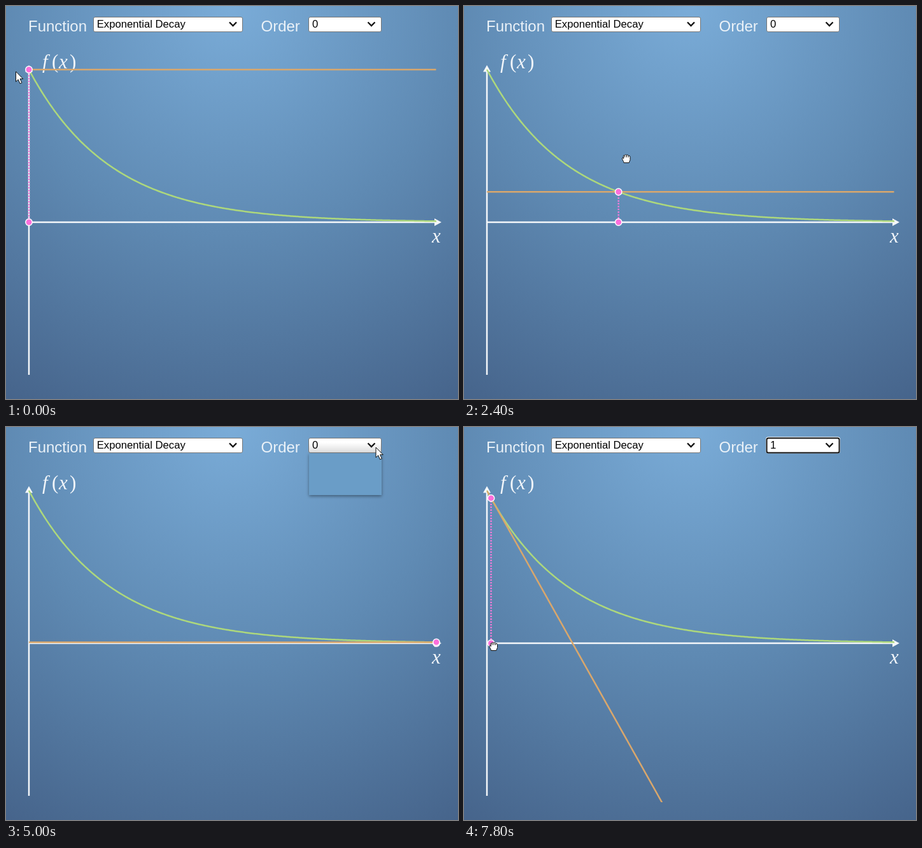
An HTML page that plays this animation: 710x618 px, repeating every 8 s.

```html
<!DOCTYPE html>
<html lang="en">
<head>
<meta charset="utf-8">
<title>Tangent approximation</title>
<style>
  html, body { margin: 0; width: 100%; height: 100%; overflow: hidden; }
  svg { display: block; width: 100%; height: 100%; }
  text { font: 16.7px "Liberation Sans", Arial, sans-serif; }
  .label { font-size: 24px; fill: #ebf2f8; }
  .math { font: 31px "Liberation Serif", "Times New Roman", serif; fill: #f2f6fa; }
  .math .var { font-style: italic; }
  .line { fill: none; stroke-width: 2.5; }
  .box { stroke: #767676; }
  .arrow { fill: none; stroke: #111; stroke-width: 2.3; }
  .cursor { fill: #fff; stroke: #111; stroke-linejoin: round; }
  .dot { fill: #fc6edb; stroke: #fff; stroke-width: 1.5; }
</style>
</head>
<body>
<svg viewBox="0 0 710 618">
  <defs>
    <radialGradient id="sky" gradientUnits="userSpaceOnUse" cx="355" cy="0" r="713">
      <stop offset="0" stop-color="#7aacd8"/>
      <stop offset=".5" stop-color="#5f8ab3"/>
      <stop offset="1" stop-color="#46648b"/>
    </radialGradient>
    <linearGradient id="pressed" x2="0" y2="1">
      <stop offset=".3" stop-color="#fff"/>
      <stop offset="1" stop-color="#dcdcdc"/>
    </linearGradient>
    <clipPath id="plot"><path d="M36 90H676V590H36Z"/></clipPath>
    <filter id="shadow" x="-20%" y="-20%" width="140%" height="150%">
      <feDropShadow dx="0" dy="2" stdDeviation="2.5" flood-opacity=".4"/>
    </filter>
  </defs>
  <rect width="710" height="618" fill="url(#sky)"/>

  <text class="label" x="35" y="40">Function</text>
  <text class="label" x="400.5" y="40">Order</text>
  <rect class="box" x="137.5" y="17.5" width="234" height="23" rx="2.5" fill="#fff"/>
  <text x="142.7" y="34">Exponential Decay</text>
  <path class="arrow" d="M351 25.5l5.5 5.5 5.5-5.5"/>
  <rect id="ring" x="474" y="15.5" width="117" height="26" rx="4" fill="#fff"/>
  <rect id="order" class="box" x="475.5" y="17.5" width="114" height="23" rx="2.5"/>
  <text id="value" x="481" y="34"></text>
  <path class="arrow" d="M568.5 25.5l5.5 5.5 5.5-5.5"/>

  <path class="line" stroke="#f4f7fa" d="M36 580V101M35 340H675"/>
  <path fill="#f4f7fa" d="M36 93l6 10.500h-12zM684 340l-11 -6v12z"/>
  <text class="math" y="98"><tspan class="var" x="57">f</tspan><tspan x="72">(</tspan><tspan class="var" x="83">x</tspan><tspan x="100">)</tspan></text>
  <text class="math var" style="font-style:italic" x="669" y="372">x</text>

  <path id="curve" class="line" stroke="#add87c"/>
  <path id="tangent" class="line" stroke="#d9a76c" clip-path="url(#plot)"/>
  <path id="drop" class="line" stroke="#fa7bdc" stroke-dasharray="2.2 2.2"/>
  <circle id="foot" class="dot" cy="340" r="5.2"/>
  <circle id="point" class="dot" r="5.2"/>

  <g id="panel">
    <rect x="476" y="41" width="114" height="66" fill="#6b9dc7" filter="url(#shadow)"/>
    <g id="options">
      <path fill="#fff" d="M476 41h114v66h-114z"/>
      <rect id="mark" x="476" width="114" height="22" fill="#1967d2"/>
      <text x="481" y="58">0</text>
      <text x="481" y="80">1</text>
      <text x="481" y="102">2</text>
    </g>
  </g>

  <path id="pointer" class="cursor" d="M0 0V16L3.700 12.600 6.500 19 9.300 17.800 6.600 11.600H11.300Z"/>
  <path id="hand" class="cursor" d="M-4 6.500C-4 4-6.500 2-6.500 0Q-6.500-2-4.300-1.500L-4.700-4Q-4.300-6-2.500-5 -1.500-7 .3-5.600 2-6.800 3.300-4.700 6-5 6-2.500V1.500C6 3.500 4.300 4.500 4.300 6.500ZM-4.300-1.500V.5M-2.300-4.800V-2M.5-5.300V-2M3.200-4.500V-2"/>
</svg>
<script>
const STEP = 200, LOOP = 8000;
const el = id => document.getElementById(id);
const set = (id, attrs) => {
  for (const key in attrs) el(id).setAttribute(key, attrs[key]);
};
const show = (id, on) => set(id, { display: on ? "inline" : "none" });

const decay = x => 240 * Math.exp((36 - x) / 128);
const yAt = x => 340 - decay(x);

// [start ms, point x, cursor kind, cursor x, cursor y]
const poses = [
  [0, 36, "pointer", 15.5, 103],
  [1000, 36, "pointer", 27, 101],
  [1200, 36, "hand", 37, 101],
  [1400, 52, "hand", 53, 128],
  [1600, 71.2, "hand", 72.5, 157],
  [1800, 86, "hand", 87, 177],
  [2000, 98, "hand", 101, 193],
  [2200, 162, "hand", 170, 219],
  [2400, 242.7, "hand", 255, 240],
  [2600, 340, "hand", 351, 258],
  [2800, 440, "hand", 451, 270],
  [3000, 530, "hand", 541, 279],
  [3200, 606.5, "hand", 617, 283],
  [3400, 676, "hand", 686, 274],
  [3600, 676],
  [4400, 676, "pointer", 644, 3],
  [4600, 676, "pointer", 606, 21],
  [4800, 676, "pointer", 581, 32],
  [5200, 676, "pointer", 575, 42],
  [5400, 676, "pointer", 560, 70],
  [5800, 676, "pointer", 560, 70],
  [6000, 676, "pointer", 610, 150],
  [6200, 676],
  [6800, 36, "hand", 27, 180],
  [7000, 36, "hand", 26, 235],
  [7200, 36, "hand", 26, 300],
  [7400, 36, "hand", 26, 338],
  [7800, 42.5, "hand", 46.5, 345]
];

let path = "M36 100";
for (let x = 38; x <= 676; x += 2) path += `L${x} ${yAt(x).toFixed(2)}`;
set("curve", { d: path });

function draw(now) {
  const t = Math.floor(now % LOOP / STEP) * STEP;
  const [, x, kind, cx, cy] = poses.findLast(pose => pose[0] <= t);
  const order = t >= 5800 ? 1 : 0;
  const y = yAt(x), slope = order * decay(x) / 128;
  const lineY = at => y + slope * (at - x);

  set("tangent", { d: `M36 ${lineY(36)}L675.5 ${lineY(675.5)}` });
  set("drop", { d: `M${x} ${y}V340` });
  set("foot", { cx: x });
  set("point", { cx: x, cy: y });

  el("value").textContent = order;
  show("ring", order);
  set("order", {
    fill: t >= 4800 && t < 5800 ? "url(#pressed)" : "#fff",
    style: order ? "stroke:#101010;stroke-width:2" : ""
  });
  show("panel", t >= 5000 && t < 5800);
  show("options", t >= 5200);
  const active = t >= 5400 ? 1 : 0;
  set("mark", { y: 41 + 22 * active });
  el("options").querySelectorAll("text").forEach((text, i) =>
    text.setAttribute("fill", i === active ? "#fff" : "#000"));

  for (const id of ["pointer", "hand"]) {
    show(id, id === kind);
    if (id === kind) set(id, { transform: `translate(${cx} ${cy})` });
  }
  requestAnimationFrame(frame);
}

let start;
function frame(now) {
  start ??= now;
  draw(now - start);
}
requestAnimationFrame(frame);
</script>
</body>
</html>
```
